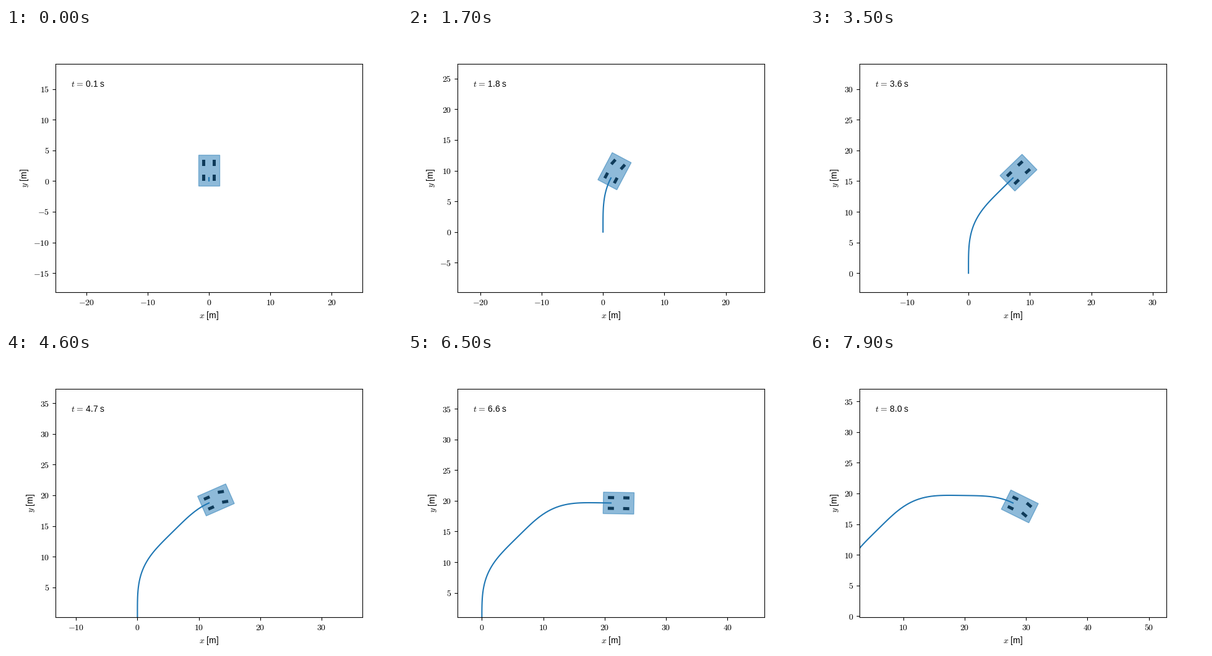
A matplotlib script for the animation above (8000 ms loop, 640 by 480 pixels).

```python
import numpy as np
import matplotlib.pyplot as plt
from matplotlib.animation import FuncAnimation
from matplotlib.patches import Polygon
from matplotlib.ticker import FuncFormatter, MultipleLocator

plt.rcParams.update({
    "font.family": "Liberation Sans",
    "font.size": 10,
    "mathtext.fontset": "cm",
})

STEPS, DT = 80, 0.1
SPEED, WHEELBASE = 5.0, 2.5
LENGTH, WIDTH = 5.0, 3.5
STEER = 0.249
VIEW = 25.0


def simulate():
    """Kinematic bicycle with the steering held constant over each step."""
    pose = np.zeros((STEPS + 1, 3))
    pose[0, 2] = np.pi / 2
    steer = -STEER * np.sin(DT * np.arange(STEPS)) ** 2
    for k, delta in enumerate(steer):
        x, y, th = pose[k]
        turn = SPEED * np.tan(delta) / WHEELBASE * DT
        # np.sinc gives the exact chord of the circular arc
        chord = SPEED * DT * np.sinc(turn / 2 / np.pi)
        mid = th + turn / 2
        pose[k + 1] = x + chord * np.cos(mid), y + chord * np.sin(mid), th + turn
    return pose, steer


def rotate(pts, angle):
    c, s = np.cos(angle), np.sin(angle)
    return np.asarray(pts) @ np.array([[c, s], [-s, c]])


def box(length, width):
    return np.array([[-1, -1], [1, -1], [1, 1], [-1, 1]]) * [length / 2, width / 2]


pose, steer = simulate()
body_shape = box(LENGTH, WIDTH) + [WHEELBASE / 2, 0]
wheel_shape = box(1.0, 0.5)
hubs = [(x, y) for x in (0, WHEELBASE) for y in (-WIDTH / 4, WIDTH / 4)]

fig, ax = plt.subplots(figsize=(6.4, 4.8), dpi=100)
area = ax.get_position()
half_h = VIEW * (area.height * 4.8) / (area.width * 6.4)

for axis, step in ((ax.xaxis, 10), (ax.yaxis, 5)):
    axis.set_major_locator(MultipleLocator(step))
    axis.set_major_formatter(FuncFormatter(lambda v, _: f"${round(v)}$"))
ax.set_xlabel("$x$ [m]")
ax.set_ylabel("$y$ [m]")

trail, = ax.plot([], [], color="C0", lw=1.5)
body = ax.add_patch(Polygon(body_shape, color="C0", alpha=0.5))
wheels = [ax.add_patch(Polygon(wheel_shape, fc="#0f3b5a", ec="none", zorder=1.5))
          for _ in hubs]
clock = ax.text(0.05, 0.9, "", transform=ax.transAxes)


def update(i):
    x, y, th = pose[i + 1]
    here = np.array([x, y])
    trail.set_data(pose[:i + 2, 0], pose[:i + 2, 1])
    body.set_xy(rotate(body_shape, th) + here)
    for wheel, hub in zip(wheels, hubs):
        angle = steer[i] if hub[0] else 0
        wheel.set_xy(rotate(rotate(wheel_shape, angle) + hub, th) + here)
    clock.set_text(r"$t\hspace{0.117}=\hspace{-0.2}$ %.1f s" % ((i + 1) * DT))
    ax.set_xlim(x - VIEW, x + VIEW)
    ax.set_ylim(y - half_h, y + half_h)
    return [trail, body, clock, *wheels]


anim = FuncAnimation(fig, update, frames=STEPS, interval=100,
                     repeat=True, repeat_delay=0)
plt.show()
```
